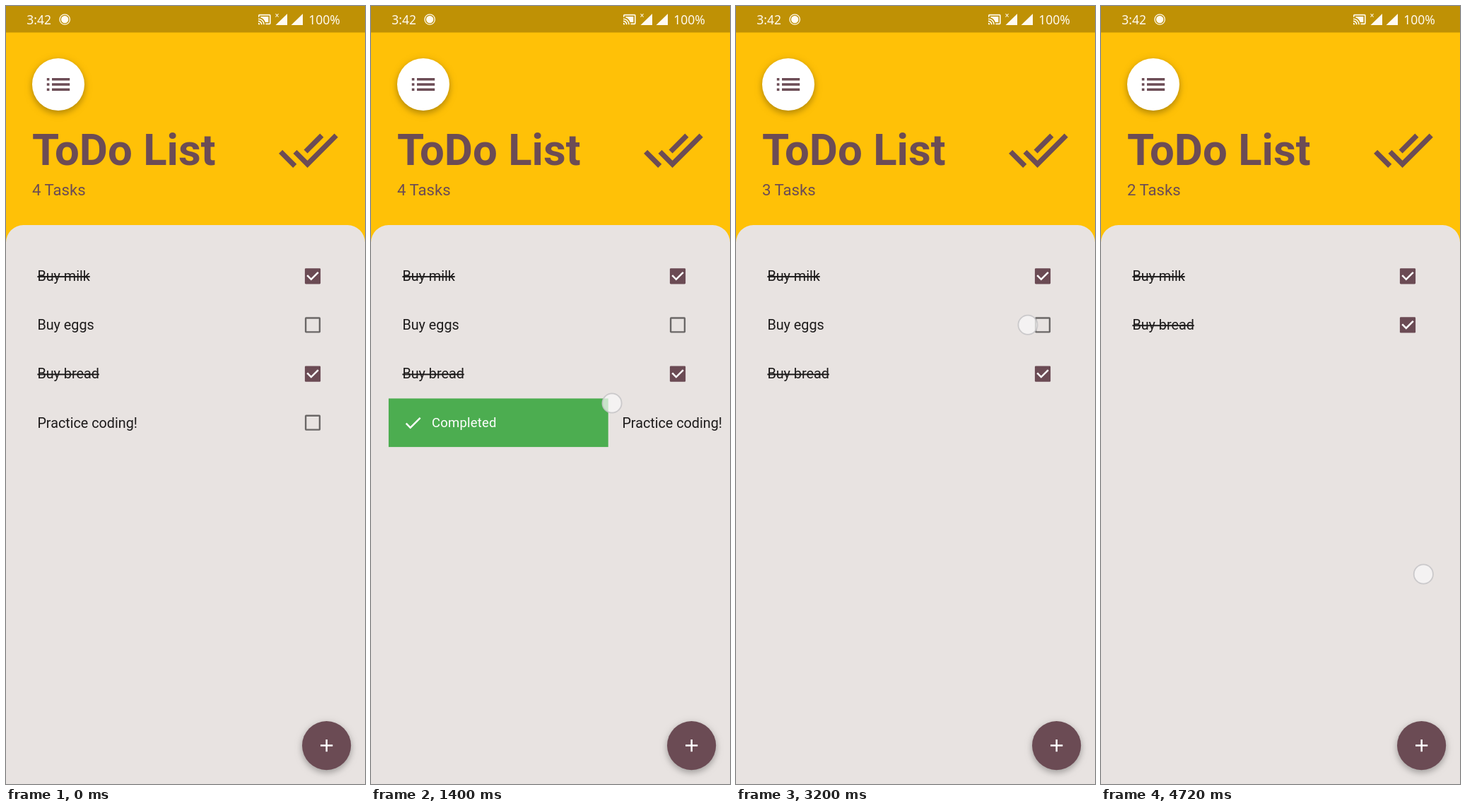
These frames come from a looping animation (508 by 1101 pixels, 5480 ms). An HTML page:

```html
<!DOCTYPE html>
<html lang="en">
<head>
<meta charset="utf-8">
<title>ToDo List</title>
<style>
  html, body { margin: 0; width: 100%; height: 100%; overflow: hidden; background: #e8e3e1; }
  svg { display: block; width: 100vw; height: 100vh; }
  text { font-family: Roboto, sans-serif; white-space: pre; }
  .status text { font-family: "Noto Sans", sans-serif; font-size: 17.5px; }
  .item { font-size: 19.75px; fill: #1d1b1b; }
  .done { text-decoration: line-through; }
  .label { font-size: 18.5px; letter-spacing: .2px; fill: #fff; }
  .raised { filter: drop-shadow(0 4px 4px rgba(0,0,0,.2)) drop-shadow(0 2px 6px rgba(0,0,0,.14)); }
</style>
</head>
<body>
<svg id="stage" viewBox="0 0 508 1101" xmlns="http://www.w3.org/2000/svg">
  <defs>
    <clipPath id="reveal"><rect id="revealBox"/></clipPath>
  </defs>
  <rect width="508" height="345" fill="#ffc107"/>
  <rect width="508" height="37.5" fill="#bf9105"/>

  <g class="status" fill="#fffaf0">
    <text x="29.3" y="25.5">3:42</text>
    <circle cx="83.2" cy="19" r="7.2" fill="none" stroke="#fffaf0" stroke-width="1.3"/>
    <circle cx="83.2" cy="19" r="5.2"/>
    <path transform="translate(356.2 9.4) scale(.8)" d="M21 3H3c-1.1 0-2 .9-2 2v3h2V5h18v14h-7v2h7c1.1 0 2-.9 2-2V5c0-1.1-.9-2-2-2zM1 18v3h3c0-1.66-1.34-3-3-3zm0-4v2c2.76 0 5 2.24 5 5h2c0-3.87-3.13-7-7-7zm0-4v2c4.97 0 9 4.03 9 9h2c0-6.08-4.93-11-11-11zM19 7H5v1.63c3.96 1.28 7.09 4.41 8.37 8.37H19z"/>
    <path d="M398 11v16h-16.500zM420 11v16h-16.500z"/>
    <path d="M381.500 11l4 4.500m0-4.500l-4 4.500" stroke="#fffaf0" stroke-width="1.1"/>
    <text x="428.300" y="25.5">100%</text>
  </g>

  <circle class="raised" cx="74" cy="111" r="37" fill="#fff"/>
  <g fill="#6c4c55">
    <path transform="translate(52.4 89.4) scale(1.8)" d="M3 7h2v2H3zM3 11h2v2H3zM3 15h2v2H3zM7 7h14v2H7zM7 11h14v2H7zM7 15h14v2H7z"/>
    <path transform="translate(384.6 160.5) scale(3.6)" d="M18 7l-1.410-1.410-6.340 6.340 1.410 1.410zm4.240-1.410L11.660 16.170 7.480 12l-1.410 1.410L11.660 19l12-12zM.410 13.410L6 19l1.410-1.410L1.830 12z"/>
    <text x="37" y="224.500" font-size="61.7" font-weight="700">ToDo List</text>
    <text id="count" x="37" y="268.300" font-size="22.2"></text>
  </g>

  <path d="M0 1101V334.700A24.700 24.700 0 0 1 24.700 310H483.300A24.700 24.700 0 0 1 508 334.700V1101z" fill="#e8e3e1"/>

  <g clip-path="url(#reveal)">
    <g id="completed">
      <rect x="24.7" width="458.6" height="69.14" fill="#4cad50"/>
      <path transform="translate(44.6 19.8) scale(1.235)" fill="#fff" d="M9 16.170L4.830 12l-1.420 1.410L9 19 21 7l-1.410-1.410z"/>
      <text class="label" x="86" y="41">Completed</text>
    </g>
    <g id="deleted">
      <rect x="24.7" width="458.6" height="69.14" fill="#f44336"/>
      <text class="label" x="346.8" y="41">Deleted</text>
      <path transform="translate(422.9 19.8) scale(1.235)" fill="#fff" d="M6 19c0 1.100.900 2 2 2h8c1.100 0 2-.900 2-2V7H6zM19 4h-3.500l-1-1h-5l-1 1H5v2h14z"/>
    </g>
  </g>
  <g id="list"></g>

  <circle class="raised" cx="453.6" cy="1046.6" r="34.6" fill="#6b4b54"/>
  <path d="M445 1046.600h17.300m-8.650-8.650v17.300" stroke="#fff" stroke-width="2.5"/>

  <circle id="touch" r="13.6" fill="#f8f8f8" fill-opacity=".72" stroke="#c4c3c5" stroke-opacity=".85" stroke-width="1.8"/>
</svg>
<script>
const LOOP = 5480, STEP = 40;
const TOP = 347.8, ROW = 69.14, LEFT = 24.7, WIDTH = 458.6;
const $ = id => document.getElementById(id);

const tasks = [
  { name: 'Buy milk', done: true },
  { name: 'Buy eggs', done: false },
  { name: 'Buy bread', done: true },
  { name: 'Practice coding!', done: false }
];

// Each swipe: finger and row positions over time, then the emptied row folds away.
const swipes = [
  {
    row: 3, pane: 'completed', start: 1160, release: 1440, full: 1550, fold: 1660, end: 1860,
    slide: [[1160, 0], [1200, 12], [1280, 115], [1360, 248], [1400, 311], [1440, 368], [1480, 412], [1550, WIDTH]],
    finger: [[1160, 32, 586], [1240, 100, 578], [1400, 341, 562], [1440, 398, 559]]
  },
  {
    row: 1, pane: 'deleted', start: 3200, release: 3480, full: 3550, fold: 3660, end: 3860,
    slide: [[3200, 0], [3240, -12], [3320, -112], [3400, -240], [3440, -310], [3480, -375], [3550, -WIDTH]],
    finger: [[3200, 413, 451.3], [3280, 342, 451], [3400, 165, 448], [3480, 45, 446]]
  }
];

const checkbox = done => done
  ? '<rect x="422.9" y="23.4" width="22.2" height="22.2" rx="1.3" fill="#6b4b54"/>' +
    '<path d="M426.2 33.400l5.600 5.600 10-10" fill="none" stroke="#fff" stroke-width="2.5"/>'
  : '<rect x="424.1" y="24.6" width="19.8" height="19.8" rx=".6" fill="none" stroke="#6b6867" stroke-width="2.4"/>';

$('list').innerHTML = tasks.map(({ name, done }) =>
  `<g><text class="item${done ? ' done' : ''}" x="44.4" y="41.3">${name}</text>${checkbox(done)}</g>`).join('');
const rows = [...$('list').children];

const clamp = v => Math.max(0, Math.min(1, v));
const show = (el, on) => el.setAttribute('display', on ? 'inline' : 'none');
const move = (el, x, y) => el.setAttribute('transform', `translate(${x} ${y})`);

function along(points, t, axis = 1) {
  let i = 1;
  while (i < points.length - 1 && t > points[i][0]) i++;
  const a = points[i - 1], b = points[i];
  return a[axis] + (b[axis] - a[axis]) * clamp((t - a[0]) / (b[0] - a[0]));
}

// cubic-bezier(.25, .1, .25, 1)
function ease(x) {
  const curve = (a, b, s) => 3 * a * s * (1 - s) ** 2 + 3 * b * s * s * (1 - s) + s ** 3;
  let lo = 0, hi = 1;
  for (let i = 0; i < 20; i++) {
    const mid = (lo + hi) / 2;
    if (curve(.25, .25, mid) < x) lo = mid; else hi = mid;
  }
  return curve(.1, 1, lo);
}

function placeTouch(x, y) {
  show($('touch'), true);
  move($('touch'), x, y);
}

function draw(t) {
  const heights = tasks.map(() => ROW), shifts = tasks.map(() => 0), hidden = new Set();
  let left = tasks.length;
  show($('touch'), false);
  if (t >= 4720) placeTouch(456.300, 804);

  for (const s of swipes) {
    if (t >= s.start) shifts[s.row] = along(s.slide, t);
    if (t >= s.start && t < s.release) placeTouch(along(s.finger, t), along(s.finger, t, 2));
    if (t >= s.full) hidden.add(s.row);
    heights[s.row] = ROW * (1 - ease(clamp((t - s.fold) / (s.end - s.fold))));
    if (t >= s.end) { left--; heights[s.row] = 0; }
  }

  const tops = [];
  heights.reduce((y, h, i) => (tops[i] = y) + h, TOP);
  rows.forEach((row, i) => {
    show(row, !hidden.has(i));
    move(row, shifts[i], tops[i]);
  });
  $('count').textContent = `${left} Tasks`;

  for (const { row, pane, start, end } of swipes) {
    const active = t >= start && t < end;
    show($(pane), active);
    if (!active) continue;
    const dx = shifts[row], h = heights[row];
    move($(pane), 0, tops[row] - (ROW - h) / 2);
    const box = { x: dx < 0 ? LEFT + WIDTH + dx : LEFT, y: tops[row], width: Math.abs(dx), height: h };
    for (const key in box) $('revealBox').setAttribute(key, box[key]);
  }
}

const begin = performance.now();
function tick() {
  const t = (performance.now() - begin) % LOOP;
  draw(Math.floor(t / STEP) * STEP);
  requestAnimationFrame(tick);
}
tick();
</script>
</body>
</html>
```
